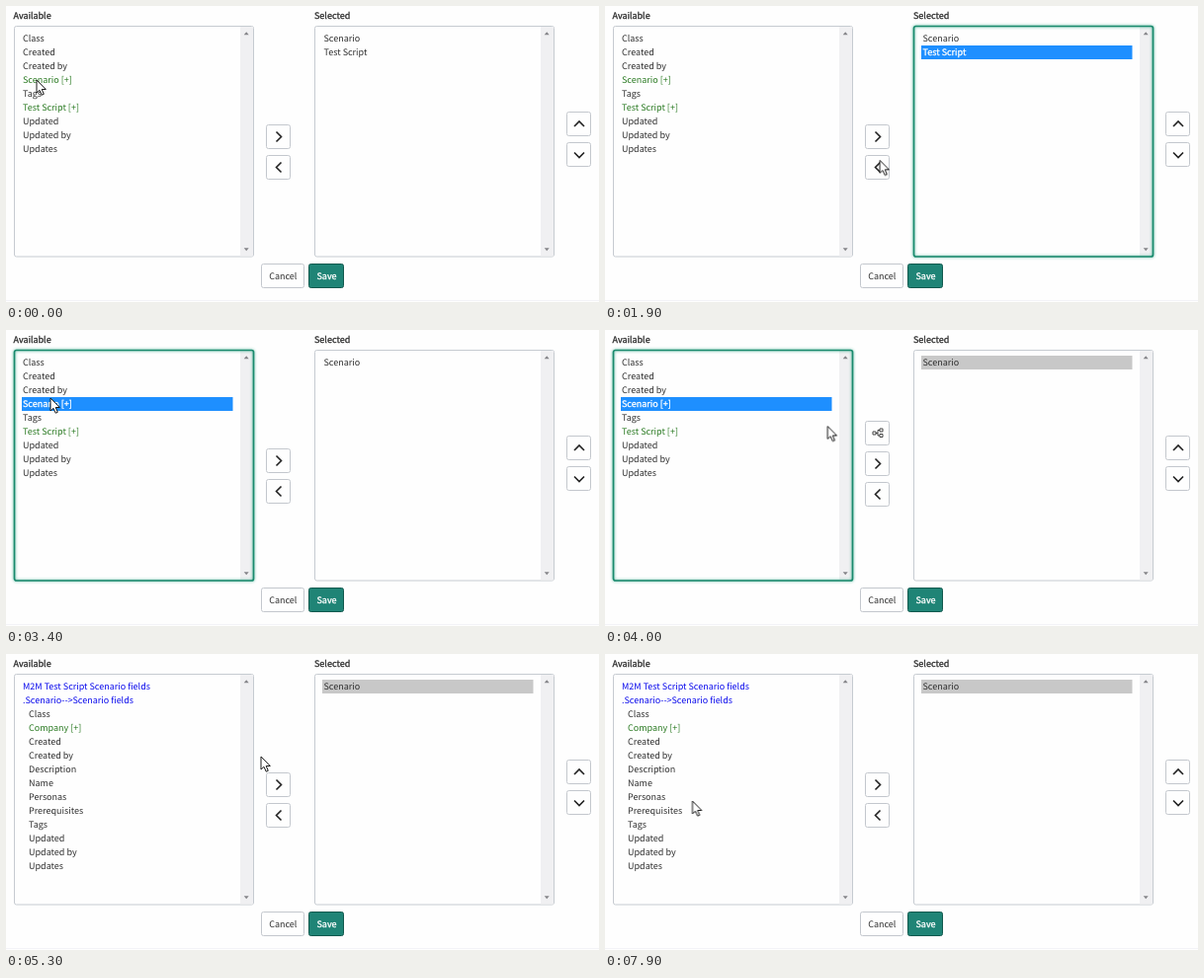
These frames come from a looping animation (600 px wide and 300 px high, 8 s). An HTML page:

```html
<!DOCTYPE html>
<html lang="en">
<head>
<meta charset="utf-8">
<title>Field picker</title>
<style>
  html, body { margin: 0; width: 100%; height: 100%; overflow: hidden; background: #fefefe; }
  svg { display: block; width: 600px; height: 300px; }
  text {
    font: 9px "Noto Sans CJK SC", "Noto Sans CJK JP", "Noto Sans CJK", "Open Sans", sans-serif;
    fill: #2e2e2e; text-rendering: geometricPrecision; white-space: pre;
  }
  .strong { stroke: #2e2e2e; stroke-width: .3px; }
  .light { fill: #fff; stroke: #fff; stroke-width: .3px; }
  .mid { text-anchor: middle; }
  .ref { fill: #2a7a22; }
  .head { fill: #0a0aec; }
  .frame { fill: #fefefe; stroke: #c6cbd1; }
  .button { fill: #fefefe; stroke: #c3c7cd; }
  .chevron { fill: none; stroke: #222; stroke-width: 1.6; }
  .focus { fill: none; stroke: #1a8a6d; stroke-width: 1.7; filter: drop-shadow(0 0 1.5px #4fb59a); }
  .blue { fill: #1e8fff; }
  .grey { fill: #c8c8c8; }

  /* Every part shares one 8 s clock. */
  .a { animation: 8s linear infinite; }
  .step { animation-timing-function: step-end; }

  #pointer { animation-name: travel; animation-timing-function: ease-in-out; }
  @keyframes travel {
    0%, 2% { transform: translate(31px, 75px); }
    12%, 18% { transform: translate(339px, 43px); }
    25%, 31.5% { transform: translate(274px, 164px); }
    40.5%, 44% { transform: translate(45px, 69px); }
    53%, 60% { transform: translate(279px, 106px); }
    66.25% { transform: translate(258px, 104px); }
    79% { transform: translate(110px, 97px); }
    89% { transform: translate(62px, 152px); }
    98%, 100% { transform: translate(88.5px, 149px); }
  }
  #arrow { animation-name: arrow; }
  #hand { animation-name: hand; }
  @keyframes arrow {
    0%, 32.5%, 63% { opacity: 1; }
    24%, 52% { opacity: 0; }
  }
  @keyframes hand {
    0%, 32.5%, 63% { opacity: 0; }
    24%, 52% { opacity: 1; }
  }

  #focusLeft { animation-name: focusLeft; }
  @keyframes focusLeft {
    0%, 28.75% { opacity: 0; }
    30% { opacity: .65; }
    32.5%, 58% { opacity: 1; }
    61%, 100% { opacity: 0; }
  }
  #focusRight { animation-name: focusRight; }
  @keyframes focusRight {
    0%, 13.5% { opacity: 0; }
    15% { opacity: .65; }
    17.5%, 28.5% { opacity: 1; }
    29.7%, 100% { opacity: 0; }
  }

  #picked { animation-name: picked; }
  @keyframes picked { 0%, 28.5% { opacity: 0; } 13.5% { opacity: 1; } }
  #removable { animation-name: removable; }
  @keyframes removable {
    0% { opacity: 1; fill: #2e2e2e; stroke: none; }
    13.5% { opacity: 1; fill: #fff; stroke: #fff; }
    28.5%, 100% { opacity: 0; }
  }
  #tip { animation-name: tip; }
  @keyframes tip { 0%, 32.5% { opacity: 0; } 26% { opacity: 1; } }

  #rowBlue { animation-name: rowBlue; }
  @keyframes rowBlue { 0%, 56% { opacity: 0; } 41% { opacity: 1; } }
  #rowGrey { animation-name: rowGrey; }
  @keyframes rowGrey { 0%, 62% { opacity: 0; } 56% { opacity: 1; } }
  #fields text:nth-child(4) { animation: rowText 8s step-end infinite; stroke-width: .3px; }
  @keyframes rowText {
    0% { fill: #2a7a22; stroke: none; }
    41% { fill: #fff; stroke: #fff; }
    56%, 100% { fill: #2e2e2e; stroke: none; }
  }
  #held { animation-name: held; }
  @keyframes held { 0% { opacity: 0; } 43.5%, 100% { opacity: 1; } }

  #expand { animation-name: expand; }
  @keyframes expand { 0%, 62% { opacity: 0; } 43.5% { opacity: 1; } }
  #expand .button { animation-name: press; }
  @keyframes press { 0%, 62% { stroke: #c3c7cd; } 56% { stroke: #3c4a4a; } }
  #movers { animation-name: shift; }
  @keyframes shift {
    0%, 62% { transform: none; }
    43.5% { transform: translateY(3px); }
  }
  #hover { animation-name: hover; filter: drop-shadow(0 2px 3px #0005); }
  @keyframes hover { 0%, 32.5% { opacity: 0; } 24% { opacity: 1; } }

  #before { animation-name: before; }
  @keyframes before { 0% { opacity: 1; } 62%, 100% { opacity: 0; } }
  #after { animation-name: after; }
  @keyframes after { 0% { opacity: 0; } 62%, 100% { opacity: 1; } }
</style>
</head>
<body>
<svg viewBox="0 0 600 300">
  <defs>
    <g id="box">
      <rect class="frame" x=".5" y=".5" width="242" height="233.5" rx="2"/>
      <path d="M229 1h13v232.5h-13z" fill="#f0f0f2"/>
      <path d="M232.7 9.3h5l-2.5-3zM232.7 225.2h5l-2.5 3z" fill="#858589"/>
    </g>
    <rect id="key" class="button" x=".5" y=".5" width="24" height="24" rx="2"/>
    <rect id="ring" x=".5" y=".5" width="242" height="233.5" rx="2"/>
  </defs>

  <path d="M0 298.5h600" stroke="#f3f3f7"/>
  <text class="strong" x="7.5" y="12.5">Available</text>
  <text class="strong" x="312" y="12.5">Selected</text>
  <use href="#box" x="8" y="20"/>
  <use href="#box" x="312" y="20"/>
  <use id="focusLeft" class="focus a" href="#ring" x="8" y="20"/>
  <use id="focusRight" class="focus a" href="#ring" x="312" y="20"/>

  <g id="before" class="a step">
    <rect id="rowBlue" class="blue a step" x="16" y="68" width="213.5" height="14"/>
    <rect id="rowGrey" class="grey a step" x="16" y="68" width="213.5" height="14"/>
    <g id="fields"></g>
  </g>
  <g id="after" class="a step">
    <text class="head" x="17" y="36">M2M Test Script Scenario fields</text>
    <text class="head" x="17" y="50">.Scenario--&gt;Scenario fields</text>
    <g id="subfields"></g>
  </g>

  <rect id="held" class="grey a step" x="320" y="26" width="213.5" height="14"/>
  <rect id="picked" class="blue a step" x="320" y="40" width="213.5" height="14"/>
  <text x="321.5" y="36">Scenario</text>
  <text id="removable" class="a step" x="321.5" y="50" stroke-width=".3">Test Script</text>

  <g id="expand" class="a step">
    <rect class="button a step" x="263.5" y="92.5" width="24" height="24" rx="2"/>
    <path d="M271 103h3v3h-3zM278 100h3v3h-3zM278 105.500h3v3h-3zM274 104.500h2M278 101.500h-2v5.500h2"
          fill="none" stroke="#333" stroke-width=".9"/>
  </g>
  <g id="movers" class="a step">
    <use href="#key" x="263" y="120"/>
    <path class="chevron" d="M273.500 127.500l5 5-5 5"/>
    <use id="hover" class="a step" href="#key" x="263" y="151"/>
    <use href="#key" x="263" y="151"/>
    <path class="chevron" d="M278.500 158.500l-5 5 5 5"/>
  </g>
  <use href="#key" x="567" y="107"/>
  <path class="chevron" d="M575 122l5-5 5 5"/>
  <use href="#key" x="567" y="138"/>
  <path class="chevron" d="M575 148.500l5 5 5-5"/>

  <rect class="button" x="258.500" y="261.500" width="43" height="24" rx="2"/>
  <text class="mid" x="280.300" y="276.500">Cancel</text>
  <rect x="306.500" y="261.500" width="35" height="24" rx="2" fill="#1f8476" stroke="#12594e"/>
  <text class="mid light" x="324.500" y="276.500">Save</text>

  <g id="tip" class="a step">
    <path d="M255 111h41q3 0 3 3v20q0 3-3 3h-12.500l-8 12-8-12H255q-3 0-3-3v-20q0-3 3-3z" fill="#050505"/>
    <text class="mid light" x="275.500" y="127.500">Remove</text>
  </g>

  <g id="pointer" class="a" fill="#fff" stroke="#1a1a1a" stroke-linejoin="round">
    <path id="arrow" class="a step" d="M0 0V13L3 10.300 5.200 15.200 7.300 14.300 5.200 9.500H9.300Z"/>
    <g id="hand" class="a step">
      <path d="M-1.500 11V1.300a1.500 1.500 0 0 1 3 0V6.500q2.600-.8 3 .8 2-.6 2.600.8 1.900-.3 1.900 1.600V13q0 2-1.400 4v2H-.5V17.500L-5.800 11q-.8-1.600.5-2.100 1.200-.2 2 .8z"/>
      <path d="M1.500 6.500v3.500M4.500 7.300v3M7.100 8.100v2.500" fill="none" stroke-width=".8"/>
    </g>
  </g>
</svg>
<script>
  const svgNS = 'http://www.w3.org/2000/svg';

  function addRows(id, x, y, names) {
    const group = document.getElementById(id);
    names.forEach((name, i) => {
      const row = document.createElementNS(svgNS, 'text');
      row.setAttribute('x', x);
      row.setAttribute('y', y + 14 * i);
      if (name.endsWith('[+]')) row.setAttribute('class', 'ref');
      row.textContent = name;
      group.append(row);
    });
  }

  addRows('fields', 17, 36, ['Class', 'Created', 'Created by', 'Scenario [+]', 'Tags',
    'Test Script [+]', 'Updated', 'Updated by', 'Updates']);
  addRows('subfields', 23, 64, ['Class', 'Company [+]', 'Created', 'Created by', 'Description',
    'Name', 'Personas', 'Prerequisites', 'Tags', 'Updated', 'Updated by', 'Updates']);
</script>
</body>
</html>
```
